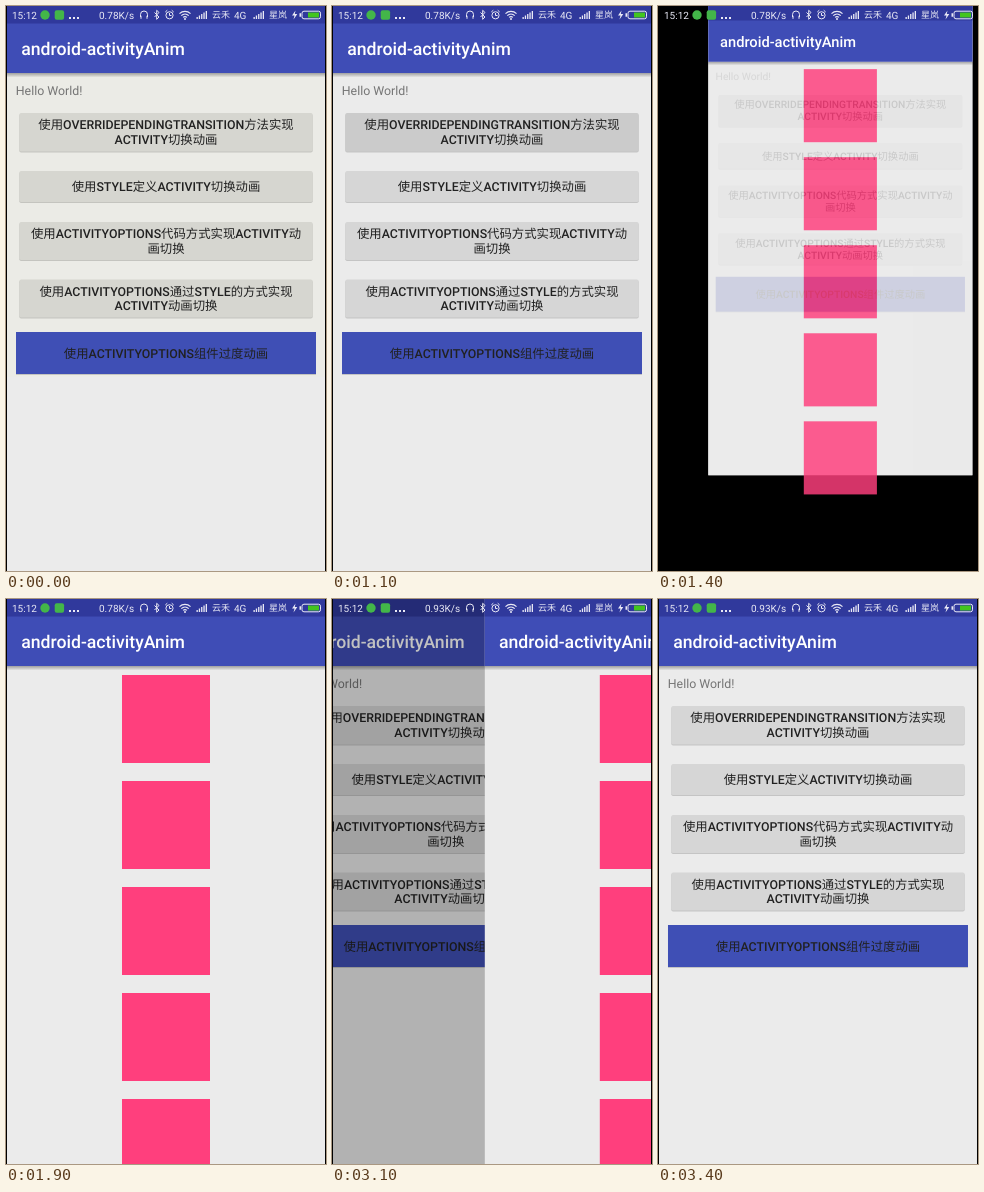
An HTML page that plays this animation: 320x565 px, repeating every 3.5 s.

```html
<!DOCTYPE html>
<html lang="zh">
<head>
<meta charset="utf-8">
<style>
html, body { margin: 0; width: 100%; height: 100%; overflow: hidden; background: #000; }
svg { display: block; width: 100vw; height: 100vh; }
text { font: 12.37px Roboto, "Noto Sans CJK SC", "Noto Sans CJK", sans-serif; text-rendering: geometricPrecision; }
.title { font-size: 17.67px; font-weight: 500; fill: #fff; }
.label { font-weight: 500; text-anchor: middle; fill: #212121; }
.status text { font-size: 10px; fill: #e9e9f5; }
.status .carrier { font-size: 9px; }
.line { fill: none; stroke: #e9e9f5; }
</style>
</head>
<body>
<svg viewBox="0 0 320 565" preserveAspectRatio="none">
  <defs>
    <linearGradient id="fade" x2="0" y2="1">
      <stop stop-opacity=".32"/><stop offset="1" stop-opacity="0"/>
    </linearGradient>
    <clipPath id="edge"><path d="M1 0h318v565H1z"/></clipPath>
    <g id="bar">
      <path d="M1 67h318v4.5H1z" fill="url(#fade)"/>
      <path d="M1 0h318v67H1z" fill="#3f4db6"/>
      <path d="M1 0h318v17.5H1z" fill="#30399c"/>
      <text class="title" x="15.2" y="49">android-activityAnim</text>
    </g>
    <path id="signal" d="M0 9h1.3v-2h-1.3zM2.3 9h1.3v-3.5h-1.3zM4.6 9h1.3v-5h-1.3zM6.9 9h1.3v-6.5h-1.3zM9.2 9h1.3v-8h-1.3z" fill="#e9e9f5"/>
  </defs>
  <g clip-path="url(#edge)">
    <g id="menu">
      <path d="M1 0h318v565H1z" fill="#ebebeb"/>
      <path id="tint" d="M1 67h318v304H1z" fill="#ebebe6"/>
      <text x="9.8" y="89" fill="#757575">Hello World!</text>
      <g id="buttons"></g>
      <use href="#bar"/>
    </g>
    <path id="dim" d="M0 0h320v565H0z"/>
    <g id="detail">
      <path d="M1 0h318v565H1z" fill="#ebebeb"/>
      <g id="squares" fill="#ff3f7d"></g>
      <use href="#bar"/>
    </g>
  </g>
  <g class="status">
    <text x="6" y="12.7">15:12</text>
    <circle cx="39" cy="9" r="4.7" fill="#43b649"/>
    <rect x="48.7" y="4.3" width="9.4" height="9.4" rx="2" fill="#43b649"/>
    <path d="M63 11h2v2h-2zM67 11h2v2h-2zM71 11h2v2h-2z" fill="#e9e9f5"/>
    <text id="speed" x="93" y="12.7"></text>
    <path class="line" d="M134.5 11V8.5a3.5 3.5 0 0 1 7 0V11M135 9.8v3M141 9.8v3M148.5 6.5l4.5 4.5-2.3 2.3v-9L153 6.5 148.5 11"/>
    <g class="line">
      <circle cx="163.5" cy="9.3" r="3.6"/>
      <path d="M163.5 7v2.5h2M159.3 6l2-1.8M167.7 6l-2-1.8"/>
      <path d="M173.5 7.6a8 8 0 0 1 11 0M175.3 9.6a5.4 5.4 0 0 1 7.4 0M177.1 11.4a2.8 2.8 0 0 1 3.8 0" stroke-width="1.2"/>
    </g>
    <circle cx="179" cy="13" r="1" fill="#e9e9f5"/>
    <use href="#signal" x="190.5" y="4"/>
    <text class="carrier" x="206" y="12.4">云禾</text>
    <text x="228" y="12.7">4G</text>
    <use href="#signal" x="247.5" y="4"/>
    <text class="carrier" x="263" y="12.4">星岚</text>
    <path d="M289.5 4.5l-3.5 5h2.5l-1 4 3.8-5.4h-2.5z" fill="#e9e9f5"/>
    <rect class="line" x="296" y="5.2" width="18.5" height="7.6" rx="2"/>
    <path d="M293.5 7.3h1.5v3.4h-1.5z" fill="#e9e9f5"/>
    <path d="M302 6.5h11v5h-11z" fill="#43c51f"/>
  </g>
</svg>
<script>
const $ = id => document.getElementById(id);
const clamp = u => Math.min(1, Math.max(0, u));

// top, height, first baseline, lines
const items = [
  [107, 38.5, 123.4, '使用OVERRIDEPENDINGTRANSITION方法实现', 'ACTIVITY切换动画'],
  [165, 31, 185.2, '使用STYLE定义ACTIVITY切换动画'],
  [216, 38, 232.3, '使用ACTIVITYOPTIONS代码方式实现ACTIVITY动', '画切换'],
  [273.5, 38, 290, '使用ACTIVITYOPTIONS通过STYLE的方式实现', 'ACTIVITY动画切换'],
  [326, 42, 352, '使用ACTIVITYOPTIONS组件过度动画']
];
const box = (x, y, w, h, r, attrs) =>
  `<rect x="${x}" y="${y}" width="${w}" height="${h}" rx="${r}" ${attrs}/>`;

$('buttons').innerHTML = items.map(([y, h, base, ...lines], i) => {
  const [x, w, r] = i < 4 ? [13.3, 293.4, 1.8] : [10, 300, 0];
  return box(x, y + 1, w, h, r, 'opacity=".17"') +
    box(x, y, w, h, r, i < 4 ? 'class="key"' : 'fill="#3f4fb5"') +
    lines.map((s, k) => `<text class="label" x="160" y="${base + k * 14.4}">${s}</text>`).join('');
}).join('');
$('squares').innerHTML = [0, 1, 2, 3, 4].map(i => box(116, 76 + i * 106, 88, 88, 0, '')).join('');
const keys = document.querySelectorAll('.key');

function draw(t) {
  const enter = (1 - Math.cos(Math.PI * clamp((t - 1108) / 400))) / 2;
  const leave = 1 - (1 - clamp((t - 2984.5) / 420)) ** 2;
  const back = leave > 0;
  const press = t < 1600 ? clamp((t - 700) / 400) : 0;
  const warm = t < 800;

  $('tint').style.display = warm ? '' : 'none';
  keys.forEach((key, i) => {
    const v = 214 - (i ? 0 : 11 * press);
    key.setAttribute('fill', `rgb(${v},${v},${v - (warm ? 6 : 0)})`);
  });

  // both screens zoom together while they cross-fade
  const zoom = `translate(${292 * (1 - enter)}) scale(${enter})`;
  const entering = enter > 0 && !back;
  $('menu').setAttribute('transform',
    back ? `translate(${-88 * (1 - leave)})` : entering ? zoom : '');
  $('detail').setAttribute('transform', back ? `translate(${320 * leave})` : zoom);
  $('detail').setAttribute('opacity', back ? (leave > 0.999 ? 0 : 1) : enter);
  $('dim').setAttribute('opacity', back ? 0.46 * (1 - leave) : 0);
  $('speed').textContent = t < 2800 ? '0.78K/s' : '0.93K/s';
}

const start = performance.now();
function tick() {
  const t = (performance.now() - start) % 3500;
  draw(Math.floor(t / 100) * 100);
  requestAnimationFrame(tick);
}
tick();
</script>
</body>
</html>
```
